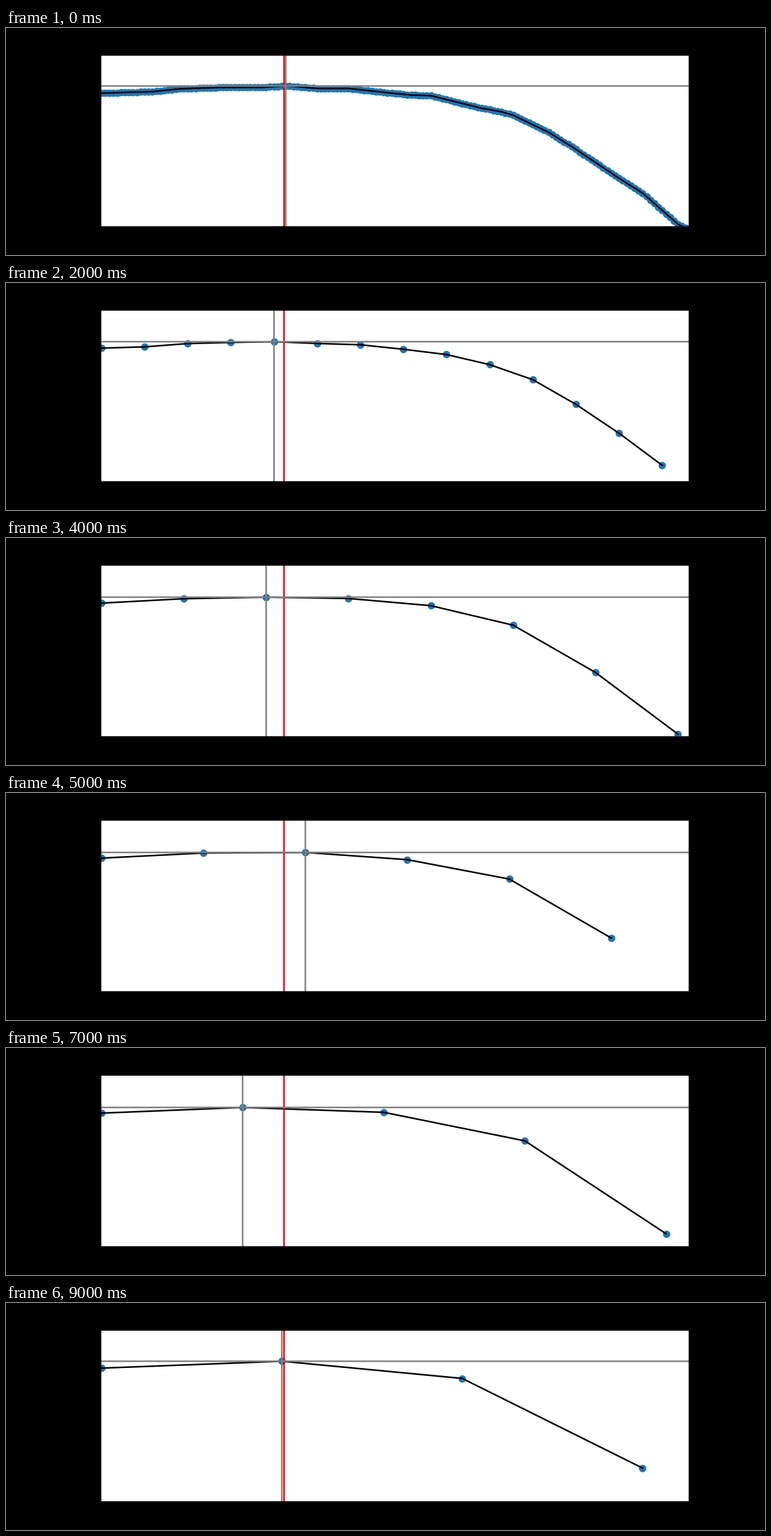
A matplotlib script that plays this animation: 1200x360 px, repeating every 10000 ms.

```python
import numpy as np
import matplotlib.pyplot as plt
from matplotlib.animation import FuncAnimation

COUNT = 150
OFFSET = 0.14  # sample 0 sits just inside the left edge
BEST = 46.7

# Bends of the measured curve: sample index, depth below the stage top.
BENDS = [
    (0, 103), (13, 100.6), (20, 96.2), (30, 94), (41, 93.9), (47.5, 91.5),
    (55, 95.6), (63, 95.6), (73, 102.4), (79, 106), (84, 107), (97, 127),
    (102, 132.5), (105, 138), (114, 165), (120, 188), (132, 238),
    (138, 261.5), (147, 310.7), (149, 317),
]

x = np.arange(COUNT)
y = np.interp(x, *zip(*BENDS))

fig, ax = plt.subplots(figsize=(10, 3), dpi=120, facecolor="black")
fig.subplots_adjust(left=0.125, right=0.9, bottom=0.125, top=0.88)
ax.set(xlim=(0, COUNT), ylim=(314.7, 42.9), xticks=[], yticks=[])
ax.patch.set_snap(False)
for spine in ax.spines.values():
    spine.set_snap(False)

dots = ax.scatter([], [], s=36, color="tab:blue")
curve, = ax.plot([], [], color="black")
ax.axvline(BEST, color="red", snap=False)
peak_x = ax.axvline(0, color="gray", snap=False)
peak_y = ax.axhline(0, color="gray", snap=False)


def update(frame):
    step = 1 + 5 * frame
    px, py = x[::step] + OFFSET, y[::step]
    top = np.argmin(py)
    dots.set_offsets(np.column_stack([px, py]))
    curve.set_data(px, py)
    peak_x.set_xdata([px[top]] * 2)
    peak_y.set_ydata([py[top]] * 2)
    return dots, curve, peak_x, peak_y


anim = FuncAnimation(fig, update, frames=10, interval=1000,
                     repeat=True, repeat_delay=0)
plt.show()
```
